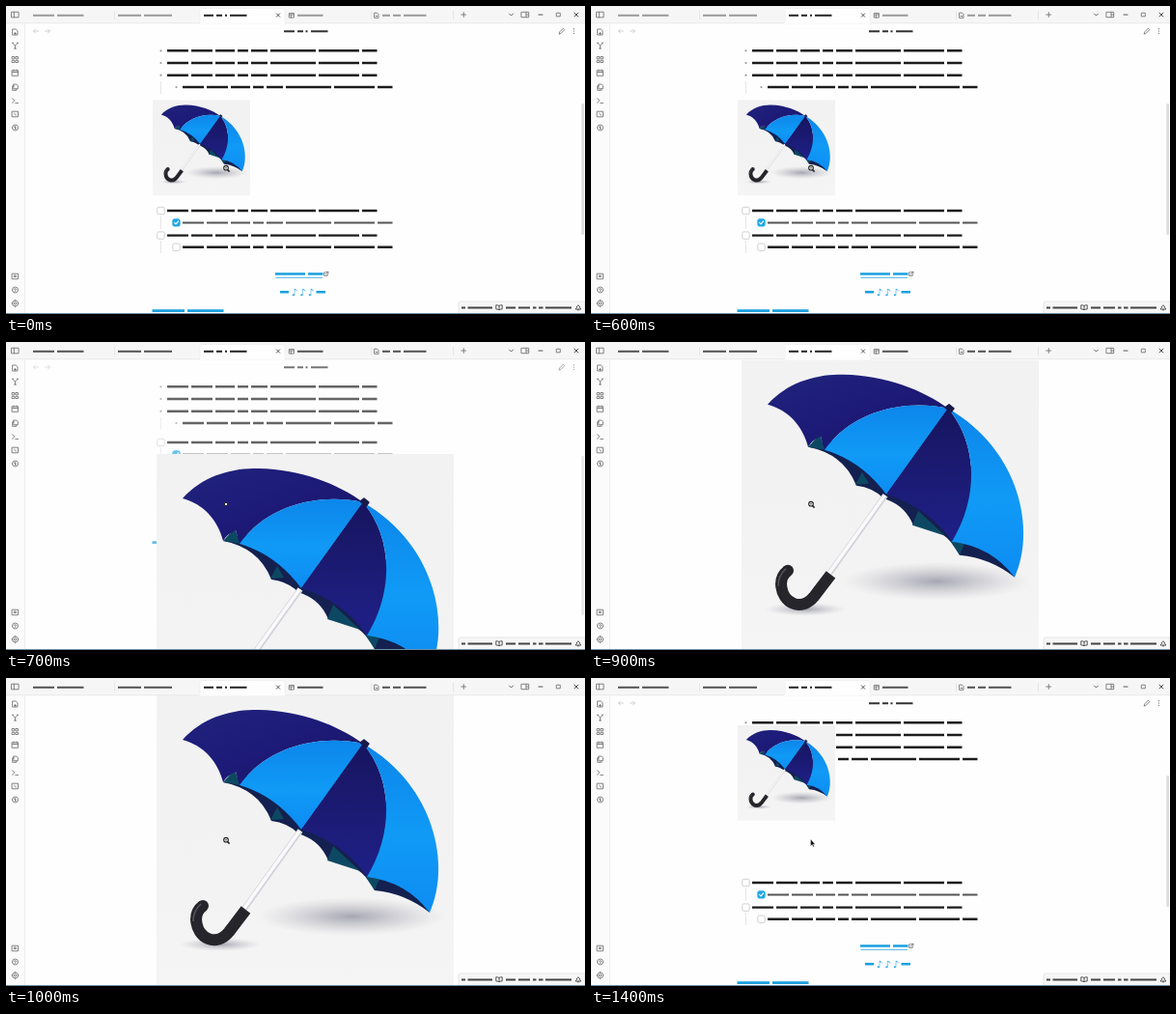
An HTML page that plays this animation: 600 px wide and 319 px high, repeating every 1.5 s.

```html
<!DOCTYPE html>
<html lang="en">
<head>
<meta charset="utf-8">
<title>Image zoom</title>
<style>
  html, body { margin: 0; width: 100%; height: 100%; overflow: hidden; background: #fefefe; }
  svg { display: block; width: 100vw; height: 100vh; }
  .icon { fill: none; stroke: #777; stroke-width: .9; stroke-linecap: round; stroke-linejoin: round; }
  .note { font: 10px "DejaVu Sans", sans-serif; fill: #1aa0df; text-anchor: middle; }
</style>
</head>
<body>
<svg viewBox="0 0 600 319">
  <defs>
    <linearGradient id="navy" x1="0" y1="0" x2="1" y2="1">
      <stop offset="0" stop-color="#20247c"/><stop offset=".5" stop-color="#1d1a78"/><stop offset="1" stop-color="#17165f"/>
    </linearGradient>
    <linearGradient id="navy2" x1="0" y1="0" x2="0" y2="1">
      <stop offset="0" stop-color="#17155f"/><stop offset="1" stop-color="#1f2088"/>
    </linearGradient>
    <linearGradient id="sky" x1="0" y1="0" x2="0" y2="1">
      <stop offset="0" stop-color="#0c86ea"/><stop offset=".55" stop-color="#109af6"/><stop offset="1" stop-color="#0d8cf2"/>
    </linearGradient>
    <linearGradient id="paper" x1="0" y1="0" x2="0" y2="1">
      <stop offset="0" stop-color="#f2f2f2"/><stop offset=".7" stop-color="#f3f3f3"/><stop offset="1" stop-color="#f5f5f5"/>
    </linearGradient>
    <radialGradient id="shade">
      <stop offset="0" stop-color="#7d7d90" stop-opacity=".65"/>
      <stop offset=".5" stop-color="#9090a0" stop-opacity=".32"/>
      <stop offset="1" stop-color="#b0b0b8" stop-opacity="0"/>
    </radialGradient>
  </defs>

  <rect width="600" height="319" fill="#fefefe"/>
  <g id="view">
    <g id="head"></g>
    <g id="list"></g>
    <g id="rest"></g>
    <rect id="thumb" x="596.3" width="2.7" rx="1.3" fill="#dcdcdc"/>
  </g>

  <g id="photo">
    <rect x="156" y="18" width="308" height="301" fill="url(#paper)"/>
    <ellipse cx="358" cy="247" rx="98" ry="20" fill="url(#shade)"/>
    <ellipse cx="222" cy="276" rx="42" ry="7" fill="url(#shade)"/>
    <path d="M225 108Q262 115 275 148Q292 150 303 161L308 163Q326 170 334 189Q368 191 382 220Q414 223 439 243L370 68Z" fill="#14204f"/>
    <path d="M225 108L237 95L243 111ZM274 147L281 134L288 146ZM333 189L339 174L367 200ZM382 220L387 208L372 205Z" fill="#0d4862"/>
    <path d="M305 158L247 239" stroke="#d2d2d8" stroke-width="6"/>
    <path d="M304.4 158L246.4 239" stroke="#fafafc" stroke-width="3.6"/>
    <path d="M183 64C204 40 236 32 262 33C306 34 344 49 370 68C320 57 268 74 242 111L238 97Q229 101 225 108C219 86 205 70 183 64Z" fill="url(#navy)"/>
    <path d="M370 68C320 57 268 74 242 111Q280 122 306 157Z" fill="url(#sky)"/>
    <path d="M370 68L306 157Q352 172 374 206C401 162 402 106 370 68Z" fill="url(#navy2)"/>
    <path d="M370 68C402 106 401 162 374 206Q415 211 439 243C461 196 446 112 370 68Z" fill="url(#sky)"/>
    <path d="M367 67L371 64L376 68L373 72Z" fill="#171a4a" stroke="#171a4a" stroke-width="1.5" stroke-linejoin="round"/>
    <path d="M248.500 240L231 263C218 279 198 270 197 250Q197 241 204 236" fill="none" stroke="#25252b" stroke-width="12"/>
    <circle cx="204" cy="236" r="6" fill="#25252b"/>
    <path d="M194 252Q194 241 202 234" fill="none" stroke="#55555e" stroke-width="1.5"/>
  </g>

  <g id="chrome"></g>
  <g id="zoom" fill="none" stroke="#222">
    <path d="M229.500 169.500L231.600 171.600" stroke-width="1.5"/>
    <circle cx="228" cy="167.700" r="2.300" fill="#fff" stroke-width="1.100"/>
    <path d="M227 167.700H229M228 166.700V168.700" stroke-width=".5"/>
  </g>
  <circle id="ring" cx="228" cy="168" r="1.7" fill="#fff" stroke="#222"/>
  <path id="arrow" d="M227.600 167V174L229.200 172.600L230.300 175L231.300 174.500L230.200 172.200H232.200Z" fill="#111" stroke="#fff" stroke-width=".3"/>
</svg>
<script>
const $ = id => document.getElementById(id);
const add = (id, html) => $(id).insertAdjacentHTML('beforeend', html);

// Redacted text: pairs of start and end along one line
const dashes = (y, ends, color, w = 2.4) => {
  let d = '';
  for (let i = 0; i < ends.length; i += 2) d += `M${ends[i]} ${y}H${ends[i + 1]}`;
  return `<path d="${d}" stroke="${color}" stroke-width="${w}"/>`;
};
const icon = (x, y, d, extra = '') =>
  `<path class="icon" transform="translate(${x} ${y})" d="${d}" ${extra}/>`;
const rect = (x, y, w, h, fill, extra = '') =>
  `<rect x="${x}" y="${y}" width="${w}" height="${h}" fill="${fill}" ${extra}/>`;

const WORDS = [167, 189, 192, 214, 217, 237, 240, 251, 254, 271, 274, 321, 324, 366, 369, 384.500];
const row = (y, nested, color = '#1c1c1c', w = 2.4) =>
  dashes(y, WORDS.map(x => x + (nested ? 16 : 0)), color, w);
const bullet = (y, nested) =>
  `<circle cx="${nested ? 176.5 : 160.5}" cy="${y}" r="1.1" fill="#999"/>` + row(y, nested);
const guide = (y1, y2) => `<path d="M160.500 ${y1}V${y2}" stroke="#e6e6e6"/>`;
const box = (y, nested, done) => {
  const x = nested ? 172.8 : 156.8;
  const fill = done ? '#1fa7e6' : '#fff', line = done ? '#1fa7e6' : '#c4c4c4';
  return rect(x, y - 3.700, 7.400, 7.400, fill, `rx="1.6" stroke="${line}" stroke-width=".8"`) +
    (done ? icon(x + 3.700, y, 'M-1.900 0L-.5 1.500L2.200 -1.600', 'style="stroke:#fff;stroke-width:1.1"') : '') +
    row(y, nested, done ? '#555' : '#1c1c1c', done ? 2 : 2.400);
};

add('head',
  dashes(26.300, [288, 299, 302, 308, 310.500, 312.500, 316, 333.500], '#333', 2) +
  icon(31, 26, 'M2.500 0H-2.500M-.5 -2L-2.500 0L-.5 2', 'style="stroke:#ccc"') +
  icon(43, 26, 'M-2.500 0H2.500M.5 -2L2.500 0L.5 2', 'style="stroke:#ccc"') +
  icon(576, 26, 'M-2.800 2.800L-2.200 .8L1.400 -2.800L2.800 -1.400L-.8 2.200Z') +
  icon(588.500, 26, 'M0 -2.300V-2.200M0 0V.1M0 2.300V2.400', 'style="stroke-width:1.2"'));

add('list', bullet(46.300) + bullet(59) + bullet(71.700) + guide(78, 91) + bullet(84, true));

const BLUE = '#1aa0df';
add('rest',
  box(212, false) + guide(218, 231) + box(224.400, true, true) +
  box(237.600, false) + guide(243, 256) + box(249.800, true) +
  dashes(277.500, [279, 310, 313, 328.500], BLUE) +
  dashes(281.300, [279.500, 328], BLUE, .8) +
  icon(331.700, 277.300, 'M-.5 -1.500H-2V2H1.500V.5M.5 -2H2.200V-.3M2 -1.800L0 .2') +
  dashes(296.200, [284, 293, 321.500, 331], BLUE) +
  [299, 307.500, 316].map(x => `<text class="note" x="${x}" y="299.500">♪</text>`).join('') +
  dashes(315.600, [151.500, 185, 188, 225.500], BLUE, 2.800));

const PAGE = 'M-2.500 -3H.8L2.500 -1.300V3H-2.500Z';
const FRAME = 'M-3 -2.800H3V2.800H-3Z';
const DISC = 'M-3 0A3 3 0 1 1 3 0A3 3 0 1 1 -3 0';
const side = [
  [27, PAGE + 'M-1 1.500H1M0 .5V2.500'],
  [41, 'M-2.500 -2.500L0 0V3M2.500 -2.500L0 0M-3 -2.800H-1.700M1.700 -2.800H3M-1 3H1'],
  [55.500, 'M-3 -3H-.7V-.7H-3ZM.8 -3H3V-.7H.8ZM-3 .8H-.7V3H-3ZM.8 .8H3V3H.8Z'],
  [69.500, FRAME + 'M-3 -1H3M-1.500 -3.500V-2.200M1.500 -3.500V-2.200'],
  [84, 'M-1.300 -3H1.300L2.800 -1.500V1.800H-1.300ZM-1.300 -1.300H-2.800V3.300H1.300V1.800'],
  [98, 'M-3 -2.300L-.7 0L-3 2.300M.3 2.600H3'],
  [112, FRAME + 'M-1 -.8L1.200 1.200'],
  [126, DISC + 'M0 -1.600V1.600M-1 -1L1 1'],
  [280, FRAME + 'M-.8 -1H.8V.5H-.8Z'],
  [294, DISC + 'M-.9 -.9Q0 -2 .9 -.9Q.9 0 0 .4M0 1.600V1.700'],
  [308, DISC + 'M-1.200 0A1.200 1.200 0 1 1 1.200 0A1.200 1.200 0 1 1 -1.200 0M0 -3.600V-3M0 3V3.600M-3.500 0H-3M3 0H3.500']
];

add('chrome',
  rect(0, 0, 600, 18, '#f6f6f6') +
  rect(0, 18, 19, 301, '#fbfbfb') +
  rect(0, 17.500, 600, .7, '#e4e4e4') +
  rect(19, 18, .7, 301, '#e9e9e9') +
  '<path d="M199 18.300Q201 18 201 15V5Q201 2.500 203.500 2.500H286.500Q289 2.500 289 5V15Q289 18 291 18.300Z" fill="#fefefe" stroke="#e6e6e6" stroke-width=".5"/>' +
  rect(201.400, 16.500, 87.200, 2, '#fefefe') +
  [112, 378, 463].map(x => rect(x, 5, .7, 9, '#dedede')).join('') +
  '<g id="tabs">' +
  dashes(9.700, [28, 50, 53, 80.500, 116, 140, 143, 172, 302, 328.500, 390, 398, 401, 409, 412, 435.500], 'currentColor', 1.900) +
  '</g>' +
  dashes(9.700, [205, 215, 218, 224, 227, 229, 232, 249.500], '#222', 2.100) +
  icon(9.500, 9, 'M-3.600 -2.800H3.600V2.800H-3.600ZM-1.200 -2.800V2.800') +
  icon(282, 9.500, 'M-1.700 -1.700L1.700 1.700M1.700 -1.700L-1.700 1.700', 'style="stroke:#444"') +
  icon(296, 9.700, 'M-2.300 -2.300H2.300V2.300H-2.300ZM-2.300 -.7H2.300M-.7 -.7V2.300') +
  icon(384, 9.700, 'M-2 -2.600H.5L2 -1.100V2.600H-2ZM-.8 .8H.8') +
  icon(474.300, 9, 'M-2.400 0H2.400M0 -2.400V2.400') +
  icon(523.500, 9, 'M-2 -1L0 1L2 -1', 'style="stroke:#555"') +
  icon(538, 9, 'M-3.700 -2.700H3.700V2.700H-3.700ZM1 -2.700V2.700M1 0H3.700') +
  icon(554, 9, 'M-2 0H2', 'style="stroke:#444"') +
  icon(572.500, 9, 'M-1.800 -1.800H1.800V1.800H-1.800Z') +
  icon(591, 9, 'M-1.900 -1.900L1.900 1.900M1.900 -1.900L-1.900 1.900', 'style="stroke:#444"') +
  side.map(([y, d]) => icon(9.500, y, d)).join('') +
  '<path d="M469 319V308.500Q469 306 471.500 306H600V319Z" fill="#f6f6f6" stroke="#dfdfdf" stroke-width=".7"/>' +
  dashes(312.500, [472, 476, 478.500, 504, 518, 528, 531, 543, 546, 549.500, 552, 556.500, 559, 586], '#444', 1.800) +
  icon(511, 312, 'M0 -1.500Q-1.500 -2.500 -3.200 -2.200V2Q-1.500 1.800 0 2.700Q1.500 1.800 3.200 2V-2.200Q1.500 -2.500 0 -1.500V2.700', 'style="stroke:#444"') +
  icon(593, 312, 'M-2.600 1.800Q-1.500 1 -1.300 -1Q0 -3.300 1.300 -1Q1.500 1 2.600 1.800ZM-.7 2.800H.7', 'style="stroke:#444"') +
  rect(0, 318, 600, 1, '#6f8fa8'));

const LOOP = 1500, STEP = 100, SMALL = 101 / 308;
const show = (id, on) => $(id).setAttribute('visibility', on ? 'visible' : 'hidden');

function draw(ms) {
  const t = Math.floor(ms % LOOP / STEP) * STEP;
  const open = t >= 700 && t < 1400;
  const closing = t >= 1400;
  const drop = 98 * (Math.max(0, 920 - t) / 220) ** 2;

  $('photo').setAttribute('transform', open
    ? `translate(0 ${drop.toFixed(2)})`
    : `translate(152 ${closing ? 49 : 97.500}) scale(${SMALL}) translate(-156 -18)`);
  $('view').setAttribute('opacity', open ? drop / 145 : 1);
  $('rest').setAttribute('transform', `translate(0 ${open ? -108 : 0})`);
  $('thumb').setAttribute('y', open ? 118 : 101);
  $('thumb').setAttribute('height', open ? 165 : 136);
  $('tabs').setAttribute('color', t < 700 ? '#999' : '#505050');

  show('ring', t === 700);
  show('arrow', closing);
  show('zoom', t !== 700 && !closing);
}

const start = performance.now();
function tick(now) {
  draw(Math.max(0, now - start));
  requestAnimationFrame(tick);
}
draw(0);
requestAnimationFrame(tick);
</script>
</body>
</html>
```
